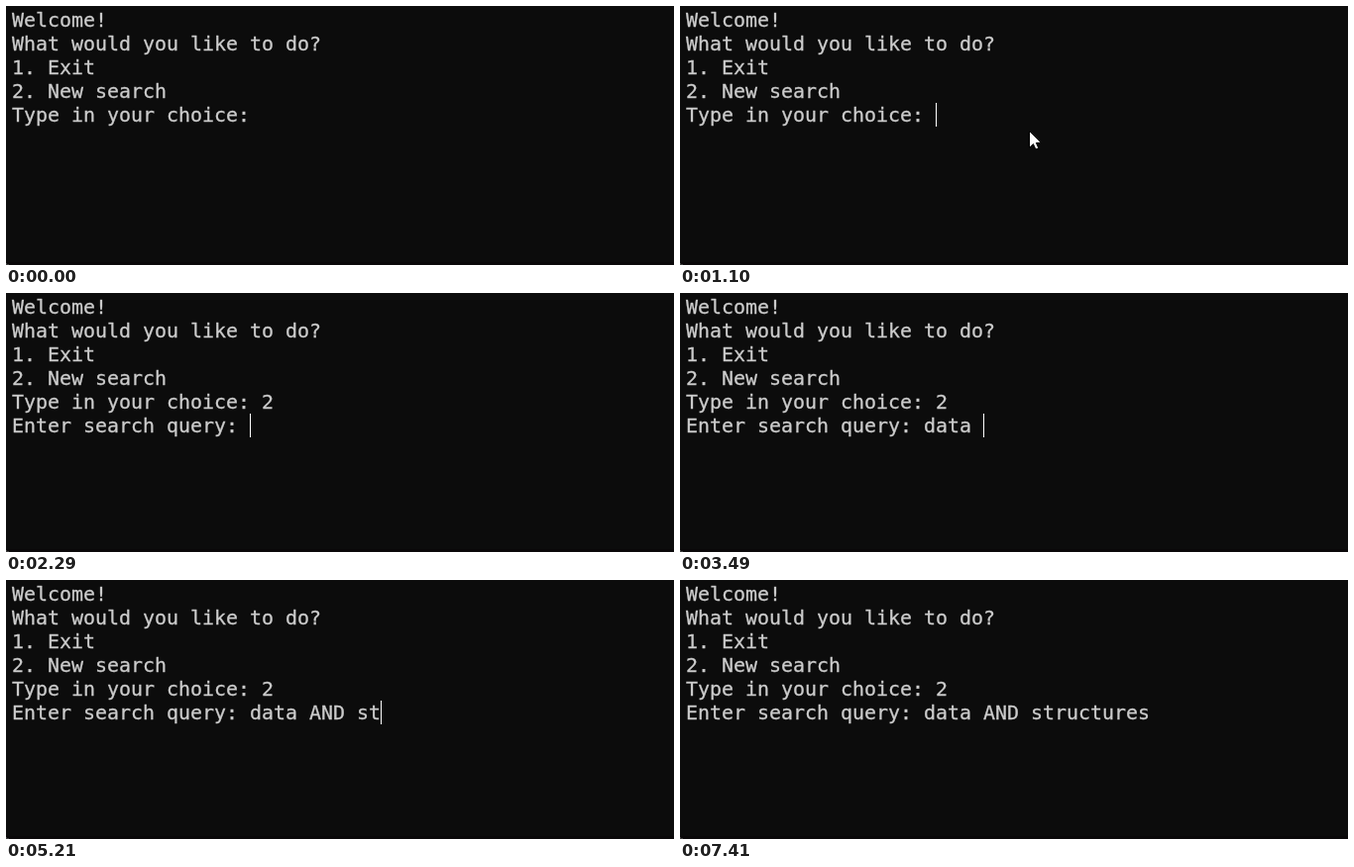
An HTML page with a canvas for the animation above (8 s loop, 674x262 px).

```html
<!DOCTYPE html>
<html lang="en">
<head>
<meta charset="utf-8">
<title>Terminal search</title>
<style>
  html, body { margin: 0; width: 100%; height: 100%; overflow: hidden; background: #0c0c0c; }
  canvas { display: block; }
</style>
</head>
<body>
<canvas id="stage" width="674" height="262"></canvas>
<script>
const ctx = document.getElementById('stage').getContext('2d');

const LOOP = 8000;
const CELL = 12, ROW = 24, LEFT = 6, TOP = 2, BASELINE = 19;
const MENU = [
  'Welcome!',
  'What would you like to do?',
  '1. Exit',
  '2. New search',
];
const CHOICE = 'Type in your choice: ';
const PROMPT = 'Enter search query: ';
const QUERY = 'data AND structures';

// Moment at which each character of the query appears
const KEY_TIMES = [
  2880, 3090, 3190, 3290, 3490, 4020, 4150, 4280, 4670, 4810,
  5210, 5490, 5620, 5820, 6150, 6350, 6490, 6580, 6680,
];
const CHOICE_TIME = 1760, PROMPT_TIME = 2290;
const FIRST_CARET_OFF = 1490, LAST_CARET_OFF = 7410;

const POINTER_IN = 200, POINTER_STEP = 68, POINTER_STEPS = 6;
const CLICK_ON = 910, CLICK_OFF = 1100, POINTER_OUT = 1830;
const POINTER_START = { x: 610, y: 250 };
const POINTER_REST = { x: 346, y: 126 };
const CLICK_POINT = { x: 352, y: 126 };

const between = (t, from, to) => t >= from && t < to;

// One character per terminal cell, thickened slightly by a thin stroke
function drawLine(text, row) {
  const y = TOP + row * ROW + BASELINE;
  [...text].forEach((char, column) => {
    const x = LEFT + column * CELL;
    ctx.fillText(char, x, y);
    ctx.strokeText(char, x, y);
  });
}

function drawCaret(column, row) {
  ctx.fillStyle = '#ffffff';
  ctx.fillRect(LEFT + column * CELL, TOP + row * ROW, 1, ROW);
}

function pointerAt(t) {
  if (t >= CLICK_ON) return CLICK_POINT;
  const step = Math.min(POINTER_STEPS, Math.floor((t - POINTER_IN) / POINTER_STEP));
  const eased = 1 - (1 - step / POINTER_STEPS) ** 2;
  const mix = (a, b) => Math.round(a + (b - a) * eased);
  return {
    x: mix(POINTER_START.x, POINTER_REST.x),
    y: mix(POINTER_START.y, POINTER_REST.y),
  };
}

function drawPointer({ x, y }) {
  const outline = [
    [0.5, 0.5], [0.5, 17.3], [4.4, 13.6], [6.9, 19], [9.8, 17.8],
    [7.4, 12.5], [12.2, 12.2],
  ];
  ctx.save();
  ctx.translate(x, y);
  ctx.beginPath();
  outline.forEach(([px, py]) => ctx.lineTo(px, py));
  ctx.closePath();
  ctx.fillStyle = '#ffffff';
  ctx.fill();
  ctx.strokeStyle = '#000000';
  ctx.lineWidth = 1;
  ctx.stroke();
  ctx.restore();
}

function drawClick({ x, y }) {
  ctx.fillStyle = 'rgba(255, 255, 0, 0.47)';
  ctx.beginPath();
  ctx.arc(x, y, 15, 0, Math.PI * 2);
  ctx.fill();
}

function drawWindow() {
  ctx.fillStyle = '#0c0c0c';
  ctx.fillRect(0, 0, 674, 262);
  ctx.fillStyle = '#0a0809';
  ctx.fillRect(0, 259, 674, 3);
  ctx.fillStyle = '#3a3a3a';
  ctx.fillRect(0, 260, 1, 1);
  ctx.fillRect(0, 261, 3, 1);
}

function render(t) {
  drawWindow();

  const chosen = t >= CHOICE_TIME;
  const prompted = t >= PROMPT_TIME;
  const typed = KEY_TIMES.filter(time => time <= t).length;
  const choiceLine = CHOICE + (chosen ? '2' : '');
  const queryLine = prompted ? PROMPT + QUERY.slice(0, typed) : '';

  ctx.font = '19.93px "DejaVu Sans Mono", "Noto Sans Mono", monospace';
  ctx.fillStyle = ctx.strokeStyle = '#cccccc';
  ctx.lineWidth = 0.3;
  [...MENU, choiceLine, queryLine].forEach(drawLine);

  if (prompted) {
    if (t < LAST_CARET_OFF) drawCaret(queryLine.length, 5);
  } else if (chosen || between(t, CLICK_ON, FIRST_CARET_OFF)) {
    drawCaret(choiceLine.length, 4);
  }

  if (between(t, POINTER_IN, POINTER_OUT)) {
    const point = pointerAt(t);
    if (between(t, CLICK_ON, CLICK_OFF)) drawClick(point);
    drawPointer(point);
  }
}

const start = performance.now();
function tick() {
  render((performance.now() - start) % LOOP);
  requestAnimationFrame(tick);
}
tick();
</script>
</body>
</html>
```
